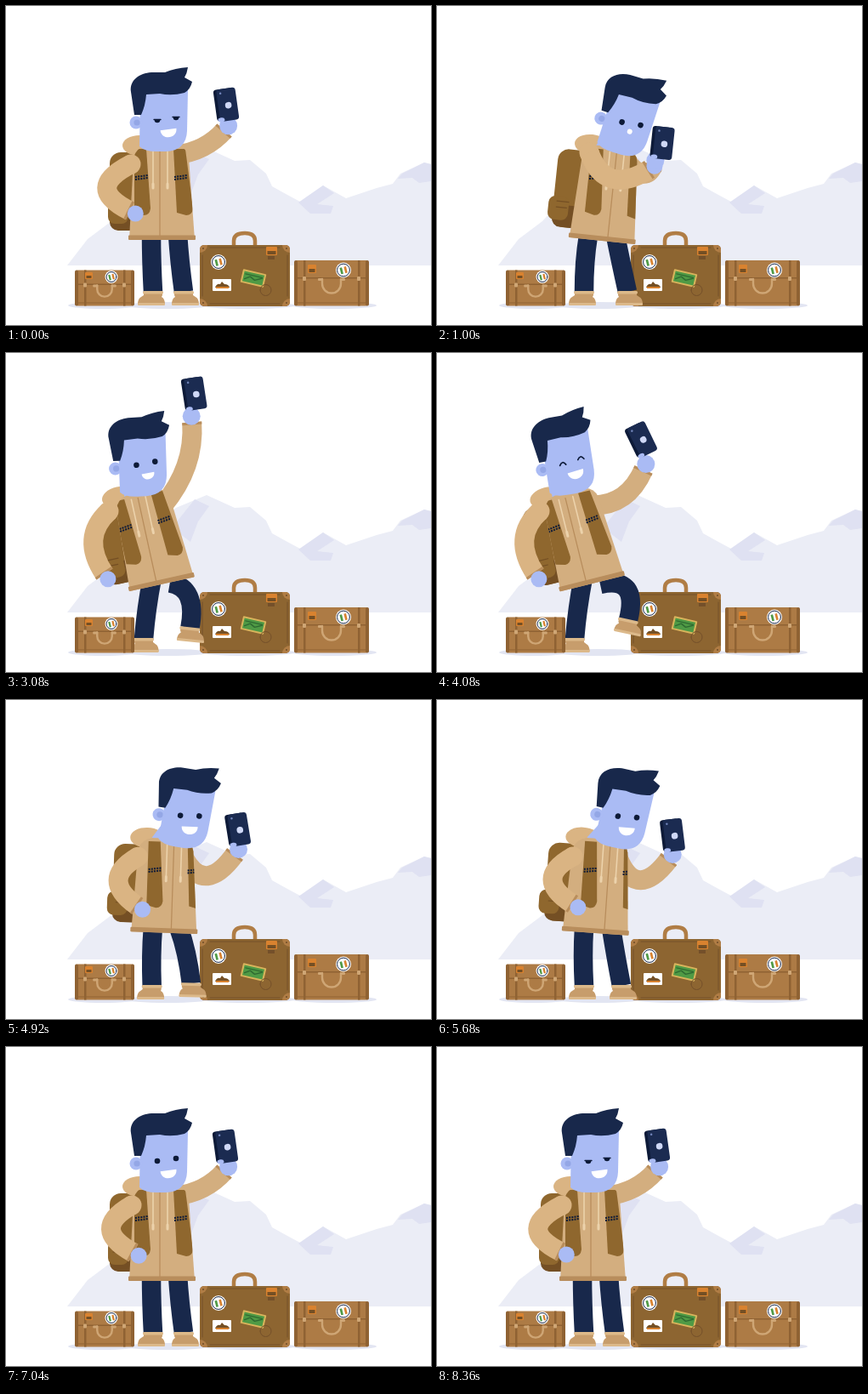
Recreate the animation shown at these times as an HTML page with a canvas. Size 500 by 375 pixels, loop 8400 ms.

```html
<!DOCTYPE html>
<html lang="en">
<head>
<meta charset="utf-8">
<title>Traveller selfie</title>
<style>
html, body { margin: 0; width: 100%; height: 100%; overflow: hidden; background: #fff; }
canvas { display: block; width: 500px; height: 375px; }
</style>
</head>
<body>
<canvas id="stage"></canvas>
<script>
const LOOP = 8400, STEP = 40;
const C = {
  hill: '#ebedf6', facet: '#dfe1f2', shade: '#e2e5f2',
  skin: '#aabbf4', skinDark: '#94a7e6', navy: '#18284b', navyDark: '#0d1a38',
  coat: '#d3ae7f', coatLight: '#dab483', coatDark: '#b88d5c',
  pack: '#8f672e', packDark: '#744f24',
  leather: '#8d6531', leatherDark: '#74502a', trim: '#b07d45',
  tan: '#ad7b45', tanDark: '#8f6233', tanLight: '#cfa675',
  boot: '#c79d6c', bootLight: '#dcb98a',
  orange: '#d9822f', green: '#4f9a45', white: '#fff'
};

const stage = document.getElementById('stage');
const scale = window.devicePixelRatio || 1;
stage.width = 500 * scale;
stage.height = 375 * scale;
const g = stage.getContext('2d');

// ---------- drawing helpers ----------
function fill(d, color) { g.fillStyle = color; g.fill(new Path2D(d)); }
function line(d, color, w, cap = 'round') {
  g.strokeStyle = color; g.lineWidth = w; g.lineCap = cap; g.lineJoin = 'round';
  g.stroke(new Path2D(d));
}
function oval(x, y, rx, ry, color) {
  g.fillStyle = color;
  g.beginPath(); g.ellipse(x, y, rx, ry, 0, 0, 7); g.fill();
}
function dot(x, y, r, color) { oval(x, y, r, r, color); }
function box(x, y, w, h, r, color) {
  g.fillStyle = color;
  g.beginPath(); g.roundRect(x, y, w, h, r); g.fill();
}
function at(x, y, deg, draw) {
  g.save(); g.translate(x, y); g.rotate(deg * Math.PI / 180); draw(); g.restore();
}

// ---------- scenery ----------
function mountains() {
  fill('M72 305L96 274L124 253L160 214L200 182L236 167L269 182L287 181L306 197L313 212' +
    'L331 222L346 230L373 211L400 226L436 214L455 209L464 197L492 184L500 186V305Z', C.hill);
  fill('M198 202L222 172L239 180L226 198L217 222L204 212Z', C.facet);
  fill('M344 231L373 211L386 220L366 233L385 235L382 244L358 244Z', C.facet);
  fill('M461 203L466 197L492 184L500 186V206L486 208L478 202Z', C.facet);
}

function roundel(x, y, r) {
  dot(x, y, r, C.white);
  g.strokeStyle = C.navy; g.lineWidth = 1;
  g.beginPath(); g.arc(x, y, r - 1.6, 0, 7); g.stroke();
  at(x, y, -14, () => {
    box(-r * .42, -r * .4, r * .3, r * .85, 0, C.green);
    box(r * .14, -r * .4, r * .3, r * .85, 0, C.orange);
  });
}

function label(x, y, w, h) {
  box(x, y, w, h, 1, C.orange);
  box(x + 1.5, y + h / 2, w - 3, h / 2 - 1, 0, C.packDark);
}

function smallCase(x, y, w, h, lid) {
  box(x, y, w, h, 4, C.tan);
  box(x, y + lid, w, 1.5, 0, C.tanDark);
  for (const sx of [x, x + w - 4]) {
    box(sx, y, 4, h, 3, C.tanDark);
    box(sx === x ? x + 11 : x + w - 13, y, 2.5, h, 0, C.tanDark);
  }
  box(x + 2, y + h - 4, w - 4, 1, 0, C.tanDark);
  const m = x + w / 2, r = w * .125, by = y + lid + 2;
  line(`M${m - r} ${by}V${by + r * .5}A${r} ${r} 0 0 0 ${m + r} ${by + r * .5}V${by}`, C.tanLight, 2.4);
  for (const s of [-1, 1]) {
    box(m + s * (r + 2) - 3, by - 1, 6, 3, 1, C.tanLight);
    box(m + s * (w / 2 - 12) - 2, by - 3, 4, 5, 1, C.tanLight);
  }
}

function leftCase() {
  smallCase(81, 310.5, 70, 42, 16);
  label(93, 313, 9, 8);
  roundel(124, 318.5, 7.5);
}

function rightCase() {
  smallCase(339, 299, 88, 53.5, 20);
  label(355, 304, 10, 10);
  roundel(397, 310.5, 9);
}

function bigCase() {
  line('M268 282V276Q268 267 281 267Q293 267 293 276V282', C.trim, 4.5, 'butt');
  box(228, 281, 106, 72, 5, C.leather);
  g.save();
  g.beginPath(); g.roundRect(228, 281, 106, 72, 5); g.clip();
  for (const x of [228, 334]) for (const y of [281, 353]) {
    dot(x, y, 9, C.trim);
    dot(x + (x < 300 ? 4 : -4), y + (y < 300 ? 4 : -4), 1.1, C.leatherDark);
  }
  g.restore();
  line('M240 284H322M240 350H322M231 293V341M331 293V341', C.leatherDark, 1);
  roundel(250, 301, 9);
  label(306, 283, 13, 10);
  box(308, 294, 8, 4, 0, C.leatherDark);
  box(243, 321, 22, 14, 1, C.white);
  fill('M246 331Q248 326 252 327L254 324L257 327Q262 327 263 331Z', C.packDark);
  box(247, 330, 15, 2, 0, C.orange);
  at(291, 320, 13, () => {
    box(-14, -8, 28, 16, 1, '#d8b45c');
    box(-12, -6, 24, 12, 0, C.green);
    line('M-10 3L-4 -1L2 2L10 -2M-10 -3H10', '#2f6b32', 1.4);
  });
  line('M299 334A6.5 6.5 0 1 0 312 334A6.5 6.5 0 1 0 299 334', C.leatherDark, 1);
}

function scenery() {
  g.fillStyle = C.white; g.fillRect(0, 0, 500, 375);
  mountains();
  for (const [x, rx] of [[114, 41], [190, 50], [284, 56], [386, 50]]) oval(x, 352, rx, 4, C.shade);
  rightCase();
  bigCase();
}

// ---------- traveller ----------
function leg([hx, hy, kx, ky, ax, ay, rot, toe]) {
  line(`M${hx} ${hy}Q${kx} ${ky} ${ax} ${ay}`, C.navy, 22.5, 'butt');
  at(ax, ay, rot, () => {
    const x = toe * 2;
    fill(`M-11 0H11V4L${x + 12} 6Q${x + 16} 8 ${x + 16} 15H${x - 16}Q${x - 16} 8 ${x - 12} 6L-11 4Z`, C.boot);
    box(-12, -1, 24, 3.5, 1.5, C.bootLight);
    box(x - 16, 13, 32, 3, 1, C.bootLight);
  });
}

// Unit vector from the elbow control point to the wrist.
function reach([, , cx, cy, wx, wy]) {
  const l = Math.hypot(wx - cx, wy - cy) || 1;
  return [(wx - cx) / l, (wy - cy) / l];
}
function hand(arm, r) {
  const [ux, uy] = reach(arm);
  dot(arm[4] + ux * 7, arm[5] + uy * 7, r, C.skin);
}
function sleeve(arm, color) {
  const [sx, sy, cx, cy, wx, wy] = arm, [ux, uy] = reach(arm);
  dot(sx, sy, 11.5, color);
  line(`M${sx} ${sy}Q${cx} ${cy} ${wx} ${wy}`, color, 23, 'butt');
  line(`M${wx - ux * 3} ${wy - uy * 3}L${wx} ${wy}`, C.coatDark, 23, 'butt');
}

function backpack(yaw) {
  box(-62, -98, 50, 92, 13, C.pack);
  box(-62, -32, 40, 26, 10, C.packDark);
  box(-64 - yaw * .4, -42, 24, 28, 8, C.pack);
  line('M-58 -36H-44M-58 -29H-46', C.packDark, 1.2);
}

function strap(x, lean) {
  fill(`M${x} -102H${x + 14}L${x + 15 + lean} -32Q${x + 14 + lean} -24 ${x + 7 + lean} -24L${x + lean - 4} -27Z`, C.pack);
  g.save();
  g.setLineDash([2, 1.2]);
  line(`M${x + 1} -69L${x + 16} -71M${x + 1} -66L${x + 16} -68`, C.navyDark, 2, 'butt');
  g.restore();
}

function coat(yaw) {
  const d = 'M-34 -92Q-30 -104 -18 -106H18Q29 -103 31 -92L38 5H-39Z';
  fill(d, C.coat);
  g.save();
  g.clip(new Path2D(d));
  strap(-33 + yaw, 4);
  strap(13 + yaw, 8);
  const z = yaw - 3;
  line(`M${z} -100V5`, C.coatDark, 1.3);
  for (const s of [-8, 9]) {
    line(`M${z + s} -100V-62`, '#ecd2ab', 1.6);
    line(`M${z + s} -61V-56`, '#ecd2ab', 3);
  }
  g.restore();
  box(-40, -.5, 79, 5.5, 1, C.coatDark);
}

function eye(x, y, lid, happy) {
  if (happy > .5) {
    line(`M${x - 3.6} ${y + 1.5}Q${x} ${y - 4.5} ${x + 3.6} ${y + 1.5}`, C.navyDark, 1.7);
    return;
  }
  g.save();
  g.beginPath(); g.rect(x - 5, y - 4 + lid * 7, 10, 10); g.clip();
  dot(x, y, 3.3, C.navyDark);
  g.restore();
  if (lid > .2) line(`M${x - 4} ${y - 4 + lid * 7}h8`, C.navyDark, 1.3);
}

function neck([x, y, rot], [hx, hy]) {
  const a = rot * Math.PI / 180;
  line(`M${x + Math.sin(a) * 95 - 3} ${y - Math.cos(a) * 95}L${hx - 6} ${hy + 10}`, C.skin, 38, 'butt');
}

function head([x, y, rot], [lid, happy, smile]) {
  at(x, y, rot, () => {
    fill('M-27 -34L29 -36L28 12Q27 35 3 36H-8Q-22 36 -28 30Z', C.skin);
    dot(-32, 2, 7.5, C.skin);
    dot(-31, 2, 3.6, C.skinDark);
    fill('M-34 -7L-38 -34C-40 -48 -28 -56 -14 -57H2Q14 -62 29 -63Q28 -56 25 -51' +
      'L34 -46Q32 -37 25 -33Q10 -29 -4 -32L-20 -31Q-21 -18 -26 -7Z', C.navy);
    eye(-7, -1, lid, happy);
    eye(15, -4, lid, happy);
    const w = 3 + 6.5 * smile, my = 7 + 3 * smile;
    if (smile < .35) dot(5, my, 3, C.white);
    else at(6, my, -7, () => fill(`M${-w} 0H${w}C${w} ${w * 1.3} ${-w} ${w * 1.3} ${-w} 0Z`, C.white));
  });
}

function phone([x, y, rot]) {
  at(x, y, rot, () => {
    box(-13, -19, 22, 37, 3.5, C.navyDark);
    box(-9.5, -19, 22.5, 38, 3.5, '#1b2b51');
    dot(2.5, 1, 3.8, '#cfd8f6');
    dot(-5, -14, 1.3, '#6f83b8');
    oval(-8, 17, 4, 2.6, C.skin);
  });
}

function traveller(p) {
  const [x, y, rot, yaw] = p.body;
  at(x, y, rot, () => backpack(yaw));
  leg(p.legR);
  leg(p.legL);
  sleeve(p.armR, C.coat);
  at(x, y, rot, () => oval(-27 + yaw * .3, -106, 20, 12, C.coatLight));
  neck(p.body, p.head);
  at(x, y, rot, () => coat(yaw));
  head(p.head, p.face);
  sleeve(p.armL, C.coatLight);
  hand(p.armL, 9.5);
  hand(p.armR, 10.5);
  phone(p.phone);
}

// ---------- poses ----------
// body: x, y, turn, yaw; legs: hip, knee, ankle, foot turn, toe side;
// arms: shoulder, elbow, wrist; face: lid, happy eyes, smile
const proud = {
  body: [184, 270, 0, 0], head: [185, 135, 0], face: [0, 0, 1],
  armL: [148, 186, 98, 214, 150, 242], armR: [200, 175, 235, 171, 257, 146], phone: [258, 117, -8],
  legL: [171, 268, 171, 300, 173, 336, 0, -1], legR: [202, 268, 204, 300, 209, 336, 0, 1]
};
const sleepy = { ...proud, face: [.5, 0, 1], armL: [147, 186, 91, 214, 146, 241], phone: [259, 116, -8] };
const check = {
  body: [195, 271, 6, 9], head: [224, 139.5, 17], face: [0, 0, 0],
  armL: [179, 172, 198, 224, 250, 192], armR: [225, 185, 245, 208, 254, 188], phone: [265, 161, 6],
  legL: [178, 270, 173, 300, 173, 336, 0, -1], legR: [210, 270, 216, 300, 224, 336, 0, 1]
};
const stretch = {
  ...check, face: [0, 0, 1],
  armL: [165, 186, 118, 214, 160, 243], armR: [226, 184, 272, 192, 317, 166], phone: [333, 142, 6]
};
const look = {
  body: [186, 268, -9, -2], head: [173.5, 137.5, 11], face: [0, 0, 0],
  armL: [134, 182, 97, 216, 140, 254], armR: [198, 194, 213, 226, 219, 188], phone: [218, 155, 3],
  legL: [173, 268, 169, 300, 161, 334, 10, .3], legR: [197, 266, 204, 300, 209, 335, 0, 1]
};
const joy = {
  body: [182, 266, -14, -4], head: [155, 130, -10], face: [0, 1, 1],
  armL: [121, 186, 87, 217, 116, 260], armR: [182, 179, 224, 180, 243, 137], phone: [240, 102, -26],
  legL: [172, 264, 165, 300, 162, 336, 0, .8], legR: [192, 272, 238, 262, 225, 314, 12, 1]
};
const swing = {
  ...joy, body: [183, 267, -12, -3], head: [162, 133, -1], face: [0, 0, .6],
  armR: [185, 180, 222, 122, 212, 66], phone: [216, 33, -4],
  legR: [193, 270, 222, 280, 214, 326, 4, 1]
};
const grin = {
  body: [187, 269, 4, 13], head: [219.5, 139, 12], face: [0, 0, 1],
  armL: [160, 184, 112, 210, 160, 240], armR: [214, 188, 236, 236, 273, 187], phone: [277, 159, -7],
  legL: [173, 268, 171, 300, 173, 336, 0, -1], legR: [205, 268, 210, 300, 217, 336, 0, 1]
};

const keys = [
  [0, sleepy], [260, sleepy], [620, stretch], [840, stretch], [1000, check],
  [1840, check], [2200, look], [2680, look], [2960, swing], [3360, joy],
  [4480, joy], [5040, grin], [5840, grin], [6400, proud],
  [7400, proud], [7640, sleepy], [LOOP, sleepy]
];

const ease = u => u * u * (3 - 2 * u);

function poseAt(t) {
  const i = Math.max(1, keys.findIndex(k => k[0] > t));
  const [t0, a] = keys[i - 1], [t1, b] = keys[i];
  const u = ease((t - t0) / (t1 - t0)), p = {};
  for (const part in a) p[part] = a[part].map((v, n) => v + (b[part][n] - v) * u);
  return p;
}

const start = performance.now();
function draw(now) {
  const t = Math.floor((Math.max(0, now - start) % LOOP) / STEP) * STEP;
  g.setTransform(scale, 0, 0, scale, 0, 0);
  scenery();
  traveller(poseAt(t));
  leftCase();
  requestAnimationFrame(draw);
}
draw(start);
</script>
</body>
</html>
```
